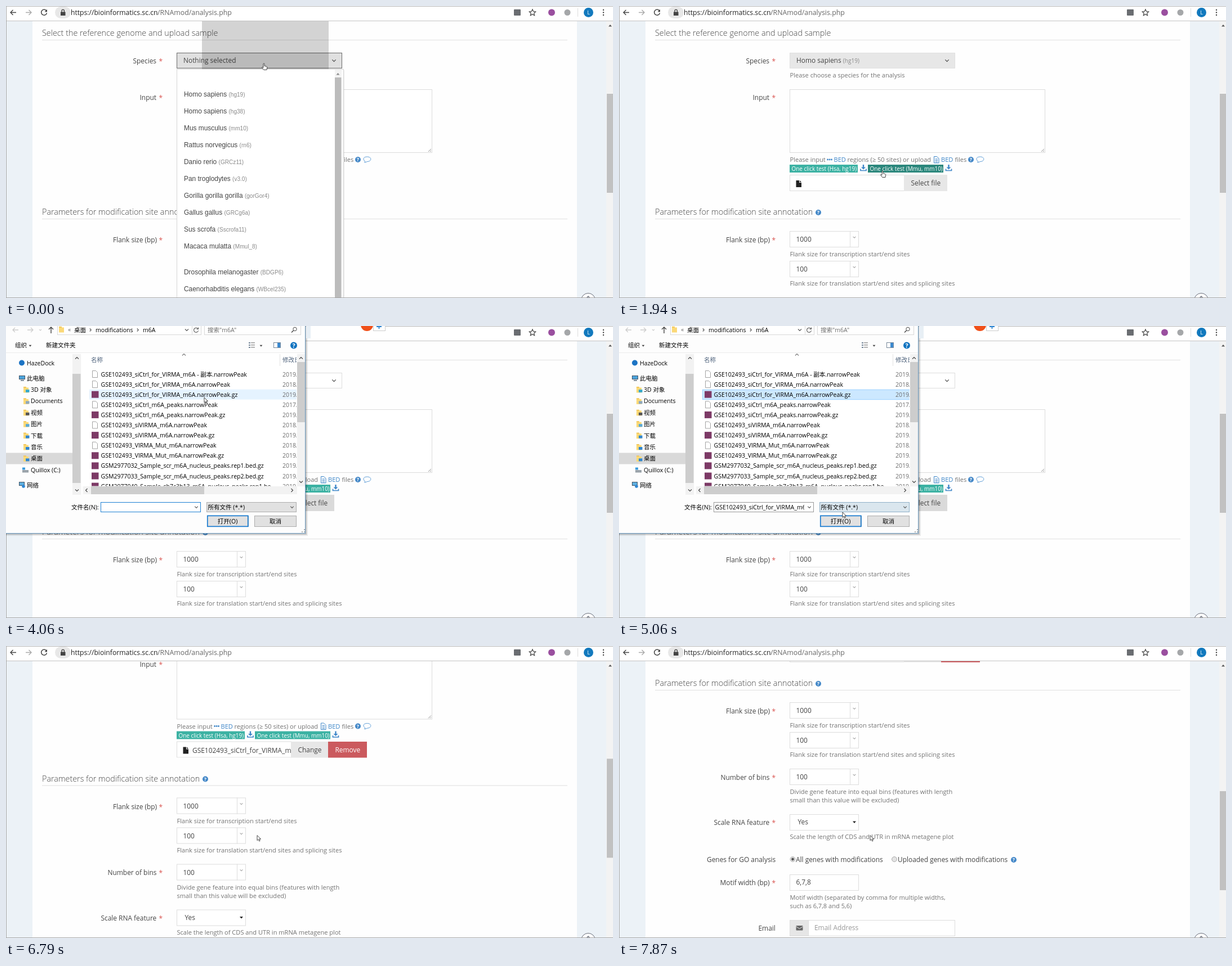
An HTML page that plays this animation: 1078 by 519 pixels, repeating every 8000 ms.

```html
<!DOCTYPE html>
<html lang="zh-CN">
<head>
<meta charset="utf-8">
<title>Upload a sample</title>
<style>
html,body{margin:0;width:100%;height:100%;overflow:hidden;background:#fff}
svg{display:block;width:100vw;height:100vh}
text{font:11.92px "Open Sans","Noto Sans CJK SC","Noto Sans CJK",sans-serif;fill:#444;white-space:pre}
.head{font-size:14.35px;font-weight:300;fill:#444}
.note{font-size:11.07px;fill:#737373}
.link{font-size:11.07px;fill:#3f87c9}
.tag{font-size:9.95px;fill:#fff}
.sub{font-size:10.1px;fill:#8a8a8a}
.star{fill:#d9534f}
.white{fill:#fff}
.hint{fill:#999}
.item,.item .sub{font-family:"Liberation Sans",Arial,sans-serif}
.url{font-size:12.15px;fill:#222}
.path{font-size:12.35px;fill:#666}
.win{font-size:10.54px;fill:#000}
.grey{font-size:10.54px;fill:#6d6d6d}
.col{font-size:10.54px;fill:#4c607a}
.mid{text-anchor:middle}
#page{transform:translateY(calc(var(--s)*-1px))}
#thumb{transform:translateY(calc(var(--s)*.34px))}
</style>
</head>
<body>
<script>
const rules = [];

// Stepped keyframes for the element with the same id; times in ms.
function key(id, steps) {
  const frames = steps.map(([t, v]) => `${t / 80}%{${v}}`).join('');
  rules.push(`@keyframes k-${id}{${frames}}#${id}{animation:k-${id} 8s step-end infinite}`);
}
function show(id, ...spans) {
  const steps = [[0, 'opacity:0']];
  for (const [a, b] of spans) {
    steps.push([a, 'opacity:1']);
    if (b < 8000) steps.push([b, 'opacity:0']);
  }
  key(id, steps);
}

const T = (x, y, s, c = '') => `<text class="${c}" x="${x}" y="${y}">${s}</text>`;
const R = (x, y, w, h, fill, line, more = '') => line
  ? `<rect x="${x + .5}" y="${y + .5}" width="${w - 1}" height="${h - 1}" fill="${fill}" stroke="${line}" ${more}/>`
  : `<rect x="${x}" y="${y}" width="${w}" height="${h}" fill="${fill}" ${more}/>`;
const P = (d, line, w = 1, fill = 'none') => `<path d="${d}" fill="${fill}" stroke="${line}" stroke-width="${w}"/>`;
const C = (x, y, r, fill, line = 'none') => `<circle cx="${x}" cy="${y}" r="${r}" fill="${fill}" stroke="${line}"/>`;
const G = (id, ...parts) => `<g id="${id}">${parts.join('')}</g>`;
// Chevron centred on x,y; d is 1 for down or right, -1 for up or left
const V = (x, y, r, line, d = 1) => P(`M${x - r},${y - d * r / 2}l${r},${d * r}l${r},${-d * r}`, line, 1.1);
const H = (x, y, r, line, d = 1) => P(`M${x - d * r / 2},${y - r}l${d * r},${r}l${-d * r},${r}`, line, 1.1);
const tri = (x, y, r, fill, d = 1) => `<path d="M${x - r},${y - d * r / 2}h${2 * r}l${-r},${d * r * 1.2}z" fill="${fill}"/>`;
const ask = (x, y, r = 5, fill = '#4488c8') => C(x, y, r, fill) +
  `<text x="${x}" y="${y + r * .68}" class="mid" style="font-size:${r * 1.8}px;font-weight:700;fill:#fff">?</text>`;

/* ---- form ---- */
const label = (x, y, s, need = true) => T(x, y, s) + (need ? T(271.5, y + 1, '*', 'star') : '');
const rule = y => R(64, y, 933, 1, '#e0e0e0');
const box = (y, w = 123) => R(303, y, w, 29, '#fff', '#ddd');
const spin = (y, v) => box(y) + R(410, y, 1, 29, '#ddd') + V(418, y + 11, 2.4, '#aaa') + T(314.5, y + 19, v);
const save = x => P(`M${x},282v6`, '#3f87c9', 2.4) +
  `<path d="M${x - 4},286.5h8l-4,4z" fill="#3f87c9"/>` + P(`M${x - 5},289.5v3h10v-3`, '#3f87c9', 1.7);
const radio = (x, on) => C(x, 679, 4.4, '#e4e4e4', '#aaa') + (on ? C(x, 679, 2.4, '#555') : '');

const page = G('page',
  T(64, 53, 'Select the reference genome and upload sample', 'head'), rule(60),
  label(225.5, 102, 'Species'),
  R(303, 83, 294, 28, '#fff', '#ddd', 'id="pick"'),
  G('unpicked', T(315, 101, 'Nothing selected')),
  G('human', T(315, 101, 'Homo sapiens <tspan class="sub">(hg19)</tspan>')),
  V(582.5, 97, 3.2, '#444'),
  T(303.5, 127, 'Please choose a species for the analysis', 'note'),
  label(237.5, 167, 'Input'),
  R(303, 148, 454, 113, '#fff', '#dcdcdc'),
  P('M750,259l5,-5M753,259l2,-2', '#888', .9),
  T(303.5, 277, 'Please input', 'note'),
  [370.7, 374.1, 377.5].map(x => C(x, 273, 1.4, '#3f87c9')).join(''),
  T(381.5, 277, 'BED', 'link'),
  T(405.5, 277, 'regions (≥ 50 sites) or upload', 'note'),
  P('M559.5,267.5h5l3.5,3.5v8h-8.5zM561.5,272h4.5M561.5,274.5h4.5M561.5,277h4.5', '#3f87c9'),
  T(572, 277, 'BED', 'link'), T(596.5, 277, 'files', 'note'), ask(625, 273),
  P('M638,276.2l-1.5,1.8q3,.2 4.5,-1.4c9,0 9,-8.6 .5,-8.6s-7.5,6 -3.5,8.2z', '#5b9bd5'),
  R(303, 282, 121, 14, '#3cb2a3'), R(442, 282, 134, 14, '#3cb2a3'),
  R(442, 282, 134, 14, '#2b877c', '', 'id="dark"'),
  T(306.5, 293, 'One click test (Hsa, hg19)', 'tag'), T(445.5, 293, 'One click test (Mmu, mm10)', 'tag'),
  save(434), save(585.5),
  R(303, 300, 204, 29, '#fff', '#ddd'),
  '<path d="M314.5,310h5.5v4h4v8h-9.5zM321,310l3,3h-3z" fill="#222"/>',
  G('empty', R(506, 300, 77, 29, '#e7e7e7'), R(506, 300, 77, 29, '#dadada', '', 'id="press"'), T(518.5, 319, 'Select file')),
  G('filled',
    `<g clip-path="url(#field)">${T(331, 320, 'GSE102493_siCtrl_for_VIRMA_m6A')}</g>`,
    R(506, 300, 66, 29, '#e7e7e7'), T(518.5, 319, 'Change'),
    R(572, 300, 69, 29, '#cb5a5e'), T(584.5, 319, 'Remove', 'white')),
  T(64, 371, 'Parameters for modification site annotation', 'head'), ask(354, 367), rule(378),
  label(190, 420, 'Flank size (bp)'),
  spin(400, '1000'), T(303.5, 445, 'Flank size for transcription start/end sites', 'note'),
  spin(453, '100'), T(303.5, 497, 'Flank size for translation start/end sites and splicing sites', 'note'),
  label(180.5, 537.5, 'Number of bins'), spin(518, '100'),
  T(303.5, 563, 'Divide gene feature into equal bins (features with length', 'note'),
  T(303.5, 578, 'small than this value will be excluded)', 'note'),
  label(168.5, 618, 'Scale RNA feature'), box(599), T(317.5, 617, 'Yes'), tri(418, 613, 3, '#222'),
  T(303.5, 643, 'Scale the length of CDS and UTR in mRNA metagene plot', 'note'),
  label(156, 684, 'Genes for GO analysis', false),
  radio(308.5, true), T(314, 684, 'All genes with modifications'),
  radio(489, false), T(495, 684, 'Uploaded genes with modifications'), ask(701, 680),
  label(179.5, 725, 'Motif width (bp)'), box(706), T(314.5, 724, '6,7,8'),
  T(303.5, 751, 'Motif width (separated by comma for multiple widths,', 'note'),
  T(303.5, 766, 'such as 6,7,8 and 5,6)', 'note'),
  label(247.5, 806, 'Email', false), box(787, 294), R(303, 787, 34, 29, '#e6e6e6', '#ddd'),
  R(314.5, 797, 12, 8.5, '#666', '', 'rx="1"'), P('M314.5,798.5l6,4l6,-4', '#e6e6e6', 1),
  T(347, 805, 'Email Address', 'hint'));

/* ---- species list ---- */
const species = ['Homo sapiens (hg19)', 'Homo sapiens (hg38)', 'Mus musculus (mm10)', 'Rattus norvegicus (rn6)',
  'Danio rerio (GRCz11)', 'Pan troglodytes (v3.0)', 'Gorilla gorilla gorilla (gorGor4)', 'Gallus gallus (GRCg6a)',
  'Sus scrofa (Sscrofa11)', 'Macaca mulatta (Mmul_8)', 'Drosophila melanogaster (BDGP6)', 'Caenorhabditis elegans (WBcel235)'];
const list = G('list',
  R(304, 114, 297, 420, '#000', '', 'opacity=".07"'), R(303, 112, 297, 420, '#fff', '#d5d5d5'),
  R(304, 142, 280, 30, '#f3f3f3', '', 'id="first"'),
  species.map((s, i) => T(316, 161 + i * 30 + (i > 9 ? 15.5 : 0),
    s.replace(/\(.*/, m => `<tspan class="sub">${m}</tspan>`), 'item')).join(''),
  R(584, 113, 12, 410, '#f3f3f3'), R(584, 127, 11.5, 400, '#bcbcbc'), tri(589.5, 121, 3, '#888', -1));

/* ---- browser frame ---- */
const frame = R(0, 0, 1078, 26, '#fff') + R(0, 26, 1078, 1, '#c4c4c4') +
  P('M18,11.5H8M12.5,7L8,11.5L12.5,16', '#444', 1.4) + P('M35,11.5h10M40.5,7L45,11.5L40.5,16', '#aaa', 1.4) +
  P('M71.8,8.5A5,5 0 1 0 72.5,12.5', '#444', 1.5) + '<path d="M73,6v4.5h-4.5z" fill="#444"/>' +
  R(87, 1, 28, 21, '#e8e8e8', '', 'rx="10.5"') +
  R(97, 10.5, 8.5, 6.5, '#444') + P('M99,11v-2.5a2.2,2.2 0 0 1 4.4,0V11', '#444', 1.3) +
  T(115, 16, 'https://bioinformatics.sc.cn', 'url') + T(269, 16, '/RNAmod/analysis.php', 'path') +
  R(902, 6, 12, 11, '#6a6d71', '', 'rx="1"') +
  P('M935,6l1.7,3.7l4,.4l-3,2.7l.9,4l-3.6,-2.1l-3.6,2.1l.9,-4l-3,-2.7l4,-.4z', '#444', 1.2) +
  C(969, 11.5, 6, '#9a4f9f') + C(997, 11.5, 5.5, '#a5a7a9') + R(1015, 4, 1, 15, '#ddd') +
  C(1034.5, 11.5, 8.5, '#1279bd') + '<text x="1034.5" y="15" class="mid white" style="font-size:9px">L</text>' +
  [7, 11.5, 16].map(y => C(1061, y, 1.2, '#444')).join('');
const sides = R(1066, 27, 12, 492, '#f3f3f3') + tri(1073, 35, 3, '#555', -1) +
  R(1067, 156, 11, 176, '#c1c1c1', '', 'id="thumb"') +
  C(1034, 523, 12.5, '#fff', '#666b78') + P('M1029,521l5,-5l5,5', '#666b78', 1.4);

/* ---- file dialog ---- */
const folder = (x, y, c) => R(x, y - 5, 5, 10, '#f0c24e') + R(x, y - 3.5, 9, 9, '#fbd978') + (c ? R(x + 4, y, 6.5, 5, c) : '');
const places = [['3D 对象', '#39a9c9'], ['Documents', '#8fa9bd'], ['视频', '#555'], ['图片', '#5aa9d6'],
  ['下载', '#2f86d2'], ['音乐', '#2f86d2'], ['桌面', '#2f86d2']];
const pk = '.narrowPeak';
const files = [`siCtrl_for_VIRMA_m6A - 副本${pk}`, `siCtrl_for_VIRMA_m6A${pk}`, `siCtrl_for_VIRMA_m6A${pk}.gz`,
  `siCtrl_m6A_peaks${pk}`, `siCtrl_m6A_peaks${pk}.gz`, `siVIRMA_m6A${pk}`, `siVIRMA_m6A${pk}.gz`,
  `VIRMA_Mut_m6A${pk}`, `VIRMA_Mut_m6A${pk}.gz`].map(s => 'GSE102493_' + s).concat(
  ['32_Sample_scr_m6A_nucleus_peaks.rep1.bed.gz', '33_Sample_scr_m6A_nucleus_peaks.rep2.bed.gz',
    '40_Sample_sh7c3h13_m6A_nucleus_peaks.rep1.be'].map(s => 'GSM29770' + s));
const years = [19, 18, 19, 17, 19, 18, 19, 18, 19, 19, 19, 19];
const rowY = i => 85.5 + i * 18.1;
const row = (s, i) => {
  const y = rowY(i);
  const icon = /gz$|be$/.test(s) ? R(152, y - 6, 12.5, 12, '#7d3a66')
    : P(`M153.5,${y - 6}h6l3,3v9h-9z`, '#999', .9, '#fff');
  return icon + T(168.5, y + 4, s, 'win') + T(491, y + 4, `20${years[i]}/`, 'grey');
};
const plain = (x, y, w, h) => R(x, y, w, h, '#e1e1e1', '#adadad');

const dialog = G('dialog',
  R(-5, -5, 541, 378, '#000', '', 'opacity=".08"'), R(-5, -5, 539, 376, '#000', '', 'opacity=".16"'),
  R(-1, -1, 533, 370, '#fdfdfd', '#6d9cc2'),
  R(533, 0, 8, 22, '#e8eff5'), R(541, 0, 133, 26, '#fff'),
  P('M22,7H12M16,3L12,7L16,11', '#ccc', 1.3) + P('M38,7h10M44,3l4,4l-4,4', '#ccc', 1.3),
  V(61, 7, 2, '#ccc'), P('M80,13V2M76,6l4,-4l4,4', '#444', 1.4),
  R(91, -3, 256, 19, '#fff', '#d9d9d9'), folder(94, 6), T(110, 10, '«', 'grey'), T(121, 10.5, '桌面', 'win'),
  H(150, 7, 2.5, '#555'), T(159, 10.5, 'modifications', 'win'), H(234, 7, 2.5, '#555'), T(243, 10.5, 'm6A', 'win'),
  V(321, 7, 3, '#555'), R(330, 0, 1, 15, '#d9d9d9'), P('M340.5,4.5A4,4 0 1 0 341.5,8M341.5,2.5v3h-3', '#555', 1.1),
  R(352, -3, 172, 19, '#fff', '#d9d9d9'), T(358, 10.5, '搜索"m6A"', 'grey'),
  C(513, 5.5, 3.2, 'none', '#444') + P('M510.5,8l-3.5,3.5', '#444', 1.3),
  T(16, 38, '组织', 'win'), tri(43, 35, 2.4, '#444'), T(71, 38, '新建文件夹', 'win'),
  [30, 34, 38].map(y => R(431, y - 1, 3, 2, '#789') + R(435, y - 1, 7, 1.5, '#999')).join(''), tri(453, 35, 2.4, '#444'),
  R(475, 29, 13, 10, '#fff', '#789'), R(482, 30, 5, 8, '#3c8ad0'), ask(511, 34.5, 6, '#1173c0'),
  R(0, 47, 531, 1, '#ececec'),
  // places
  R(118, 50, 15, 250, '#f2f2f2'), R(118, 85, 14.5, 194, '#cdcdcd'), V(126, 57, 3, '#444', -1), V(126, 292, 3, '#444'),
  R(0, 225.5, 118, 20, '#d9d9d9'),
  C(28, 65.5, 5, '#1c74c4'), T(37, 69.5, 'HazeDock', 'win'),
  R(23, 88, 11, 7, '#4aa3dc', '#456'), R(26, 96, 6, 1.5, '#567'), T(37, 97, '此电脑', 'win'),
  places.map(([s, c], i) => folder(31, 113 + i * 20.4, c) + T(44, 117 + i * 20.4, s, 'win')).join(''),
  R(29, 256, 11, 4.5, '#9aa3aa'), R(29, 251.5, 5, 4, '#3a9bdc'), T(44, 260, 'Quillox (C:)', 'win'),
  R(23, 277, 10, 7, '#5fb0e0', '#456'), C(31, 285, 2.8, '#2f86d2'), T(37, 286.5, '网络', 'win'),
  // file list
  R(134, 48, 383, 237, '#fff'), T(151, 64, '名称', 'col'), V(316, 51, 3, '#777', -1), R(486, 50, 1, 21, '#e2e2e2'),
  '<g clip-path="url(#rows)">', T(491, 64, '修改日期', 'col'),
  R(148, rowY(0) - 9, 368, 18, '#e5f3ff', '', 'id="hover"'),
  R(148, rowY(2) - 9, 371, 18.5, '#cce8ff', '#99d1ff', 'id="chosen"'),
  files.map(row).join(''), '</g>',
  R(517, 50, 14, 235, '#f2f2f2'), R(517, 64, 14, 107, '#cdcdcd'), V(524, 57, 3, '#444', -1), V(524, 277, 3, '#444'),
  R(137, 285, 380, 14, '#f2f2f2'), R(151, 285, 201, 14, '#cdcdcd'), H(143, 292, 3, '#444', -1), H(508, 292, 3, '#444'),
  // name and buttons
  T(116, 325.5, '文件名(N):', 'win'),
  R(168, 313, 178, 18, '#fff', '#999'),
  R(168, 313, 178, 18, 'none', '#1d80d3', 'id="focus"'), R(171, 315, 1, 13, '#111', '', 'id="caret"'),
  G('name', `<g clip-path="url(#short)">${T(170.5, 325.5, files[2], 'win')}</g>`),
  V(338, 322, 2.7, '#555'),
  plain(356, 313, 160, 18), R(356, 313, 160, 18, '#dae6ee', '#8fb0c8', 'id="combo"'),
  T(358.5, 325.5, '所有文件 (*.*)', 'win'), V(508, 322, 2.7, '#555'),
  plain(357, 337, 74, 20), R(357, 337, 74, 20, '#e5f1fb', '', 'id="open"'),
  '<rect x="357.8" y="337.3" width="72" height="19" fill="none" stroke="#1a7cd0" stroke-width="1.7"/>',
  T(393.5, 351, '打开(O)', 'win mid'),
  plain(441, 337, 75, 20), T(478.5, 351, '取消', 'win mid'),
  [[529, 361], [529, 365], [525, 365]].map(([x, y]) => R(x, y, 2, 2, '#aaa')).join(''));
const bar = G('bar', C(641, -2, 11, '#f0501a'), R(652, -3, 22, 12, '#fff', '#ccc'),
  P('M658,1h9M662.5,0v5', '#2f86d2', 1.8));

/* ---- pointer ---- */
const pointer = G('pointer',
  G('hand', P('M-1,.6q1,-1.5 2,0v4l3.5,.8q1.4,.4 1.2,1.9l-.7,4.2h-5.3l-3.2,-4.2q.2,-1.3 1.4,-.5l1.1,.8z', '#333', .9, '#fff')),
  G('beam', P('M-2.3,-6.5h1.8l.5,.5l.5,-.5h1.8M0,-6v12M-2.3,6.5h1.8l.5,-.5l.5,.5h1.8', '#333', .9)),
  G('arrow', P('M0,0V9.2L2.2,7.2L3.7,10.4L5.2,9.7L3.8,6.6H6.6Z', '#333', .9, '#fff')));

/* ---- timing ---- */
key('stage', [[0, 0], [6360, 1], [6510, 7], [6790, 130.5], [6920, 174], [7190, 205], [7310, 261], [7870, 300]]
  .map(([t, s]) => [t, `--s:${s}`]));
key('pointer', [[0, 458, 102], [270, 452, 112], [400, 430, 132], [550, 398, 148], [700, 334, 148], [830, 371, 150],
  [1380, 372.5, 155], [1670, 400, 215], [1790, 456, 285], [1940, 468, 293], [2060, 476, 298], [2210, 512, 310],
  [2340, 539, 320.5], [3400, 473, 268], [3550, 436, 226], [3670, 392, 158], [3820, 366, 135], [3950, 352, 127],
  [4180, 345, 124], [4820, 352, 165], [4940, 380, 268], [5060, 397, 331], [5180, 400, 338], [5300, 404, 344],
  [5420, 408, 348], [5540, 410, 350], [5690, 416, 348], [5820, 424, 344], [5940, 430, 341], [6090, 446, 336.5]]
  .map(([t, x, y]) => [t, `transform:translate(${x}px,${y}px)`]));
key('ripple', [[0, 112.5, .17], [120, 178.5, .1], [270, 240, .05], [400, 270, .02], [550, 270, 0]]
  .map(([t, r, o]) => [t, `transform:translate(460.5px,107px) scale(${r});opacity:${o}`]));
key('pick', [[0, 'fill:#e0e0e0;stroke:#6b6b6b'], [1250, 'fill:#e7e7e7;stroke:#e0e0e0'], [2620, 'fill:#fff;stroke:#ddd']]);
key('hover', [[0, 'opacity:0'], ...[[3550, 8], [3670, 4], [3820, 3], [3950, 2]]
  .map(([t, i]) => [t, `opacity:1;transform:translateY(${i * 18.1}px)`]), [4570, 'opacity:0']]);
show('unpicked', [0, 1250]);
show('human', [1250, 8000]);
show('list', [0, 1250]);
show('first', [550, 1250]);
show('dark', [1940, 2060]);
show('press', [2340, 5690]);
show('empty', [0, 5820]);
show('filled', [5820, 8000]);
show('dialog', [3030, 5690]);
show('bar', [3030, 5540]);
show('focus', [3030, 4570]);
show('caret', [3030, 3670], [4180, 4570]);
show('chosen', [4570, 8000]);
show('name', [4570, 8000]);
show('combo', [5060, 5180]);
show('open', [5180, 8000]);
show('hand', [0, 1380], [1940, 2060], [2340, 3030]);
show('beam', [1380, 1790]);
show('arrow', [1790, 1940], [2060, 2340], [3030, 8000]);

const clip = (id, x, y, w, h) => `<clipPath id="${id}">${R(x, y, w, h, '#000')}</clipPath>`;
document.body.innerHTML = `<style>${rules.join('')}</style>
<svg id="stage" viewBox="0 0 1078 519" preserveAspectRatio="none">
<defs>${clip('field', 304, 301, 202, 27)}${clip('rows', 134, 48, 382, 236.5)}${clip('short', 169, 314, 160, 16)}</defs>
${R(0, 0, 1078, 519, '#ecf2f7')}${R(47, 27, 967, 492, '#fefefe')}
${page}<rect id="ripple" x="-1" y="-1" width="2" height="2"/>${list}${sides}${frame}
${R(0, 0, 1, 519, '#a8a8a8')}${R(0, 0, 1078, 1, '#b8b8b8')}${R(0, 518, 1078, 1, '#a8a8a8')}
${dialog}${bar}${pointer}</svg>`;
</script>
</body>
</html>
```
